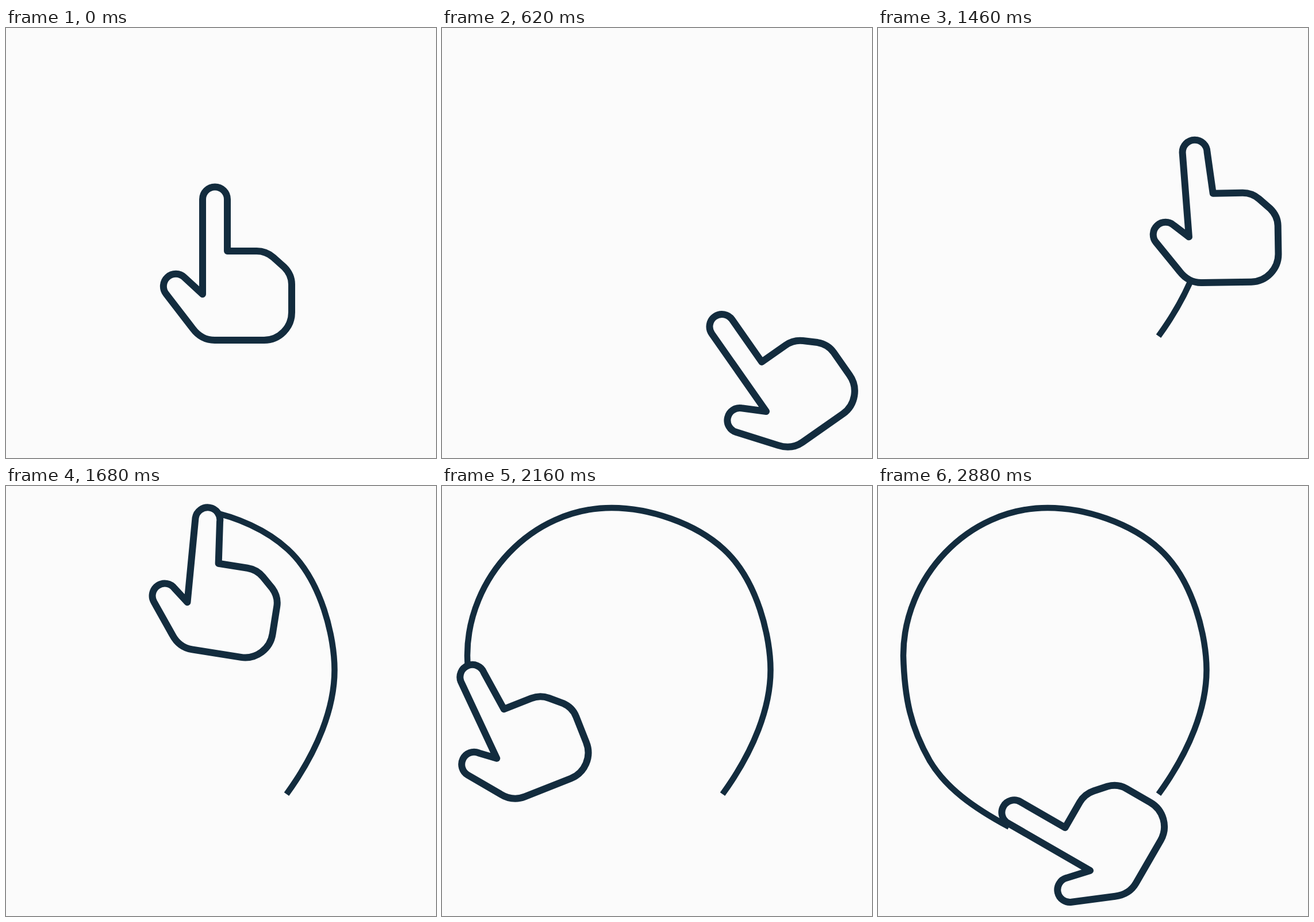
An HTML page for the animation above (3000 ms loop, 748x748 px).

```html
<!DOCTYPE html>
<html lang="en">
<head>
<meta charset="utf-8">
<title>Drawing hand</title>
<style>
  html, body { margin: 0; width: 100%; height: 100%; overflow: hidden; background: #fbfbfb; }
  svg { display: block; width: 100%; height: 100%; }
  path { stroke: #132c3e; }
  #line { fill: none; stroke-width: 10.5; }
  #hand { fill: #fbfbfb; stroke-width: 12; stroke-linejoin: round; }
</style>
</head>
<body>
<svg viewBox="0 0 748 748">
  <path id="line" stroke-dasharray="0 9999" d="M488 536 C543 460 571.5 385 571.5 320 C571.5 265 550 165 490 110
    C440 64 360 38 295 38 C155 38 44 160 44 295 C46 370 57 420 90 478 C118 525 165 559 228 593"/>
  <path id="hand"/>
</svg>
<script>
const line = document.getElementById('line');
const hand = document.getElementById('hand');
const total = line.getTotalLength();

const LOOP = 3000, LAST = 2880, STEP = 20;

// Positions of the notch between thumb and finger
const HOME = [342, 463], BEND = [577, 576], HOVER = [564, 667], REST = [369, 669];

// Where the pressed finger touches the line, seen from the notch
const CONTACT = [10, -162];

// Eased 0 to 1 between two times
function ease(t, from, to) {
  const u = Math.min(1, Math.max(0, (t - from) / (to - from)));
  return u < 0.5 ? 2 * u * u : 1 - 2 * (1 - u) ** 2;
}

const mix = (a, b, u) => a.map((v, i) => v + (b[i] - v) * u);

const turnAt = t =>
  -35 * ease(t, 0, 610) + 44 * ease(t, 1005, 1690) - 69 * ease(t, 1920, 2430);

// Fast to the top of the loop, then on to its end
const drawnAt = t =>
  total * (0.498 * ease(t, 1005, 1920) + 0.502 * ease(t, 1920, 2390));

function rotate([x, y], degrees) {
  const r = degrees * Math.PI / 180, c = Math.cos(r), s = Math.sin(r);
  return [x * c - y * s, x * s + y * c];
}

// Arrive in an arc, hold the contact point on the line, then let go
function notchAt(t, press, release) {
  const e = ease(t, 0, 610);
  const hover = mix(mix(HOME, BEND, e), mix(BEND, HOVER, e), e);
  const { x, y } = line.getPointAtLength(drawnAt(t));
  const [cx, cy] = rotate(CONTACT, turnAt(t));
  return mix(mix(hover, [x - cx, y - cy], press), REST, release);
}

// Pressing shortens the finger and pulls the thumb in
function handPath(p) {
  const cx = 21.5 - 9 * p, cy = -165 + 18 * p;
  const dx = 6 * p, dy = 9 * p;
  return `M0 0 L${cx - 21.5} ${cy} a21.5 21.5 0 0 1 43 0 L43 -75 H94
    C106 -75 115 -71 123 -64 L142 -47 C151 -38 155 -28 155 -17 V31
    A48.5 48.5 0 0 1 107 80 H21 C5 80 -8 72 -17 60
    L${-63.5 + dx} ${-0.4 + dy} A21.5 21.5 0 0 1 ${-31.7 + dx} ${-29.2 + dy} Z`;
}

function render(now) {
  const t = Math.min(LAST, Math.floor(now % LOOP / STEP) * STEP);
  const press = ease(t, 960, 1040), release = ease(t, 2500, 2880);
  const [x, y] = notchAt(t, press, release);
  hand.setAttribute('d', handPath(press - release));
  hand.setAttribute('transform', `translate(${x} ${y}) rotate(${turnAt(t)})`);
  line.setAttribute('stroke-dasharray', `${drawnAt(t)} 9999`);
}

const start = performance.now();
function tick() {
  render(performance.now() - start);
  requestAnimationFrame(tick);
}
tick();
</script>
</body>
</html>
```
